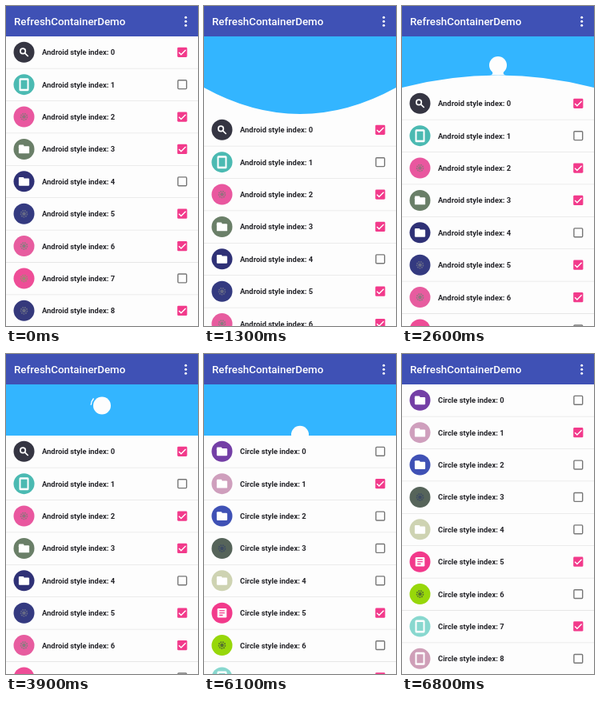
Animation, 240 px wide and 400 px high, one loop 7.5 s. Source, as an HTML page with a canvas:

```html
<!DOCTYPE html>
<html lang="en">
<head>
<meta charset="utf-8">
<title>RefreshContainerDemo</title>
<style>
  html, body { margin: 0; width: 100%; height: 100%; overflow: hidden; background: #fdfdfd; }
  canvas { display: block; width: 240px; height: 400px; }
</style>
</head>
<body>
<canvas id="stage" width="240" height="400"></canvas>
<script>
const c = document.getElementById('stage').getContext('2d');
const LOOP = 7500, STEP = 100;
const BAR = 38, HEAD = 64, BASE = BAR + HEAD, PULL = 97, ROW = 40.38;
const CX = 120, R = 11, BALL_Y = 64.5, STROKE = 1.4;
const WHITE = '#fdfdfd', BLUE = '#33b5ff', PINK = '#f23a8b';
// Times in ms
const PULL_AT = 650, RELEASE = 2320, SPIN_AT = 2690, FINISH = 5550, CLOSE = 6390;

// [avatar colour, icon, checked, icon colour]
const android = [
  ['#353542', 'search', 1], ['#4bbab2', 'phone', 0], ['#e9579f', 'gear', 1, '#97707f'],
  ['#6a7f68', 'folder', 1], ['#2f3176', 'folder', 0], ['#343a80', 'gear', 1, '#666a86'],
  ['#e75c9f', 'gear', 1, '#8d7a80'], ['#ee4d97', 'gear', 0, '#a18575'], ['#35397c', 'gear', 1, '#666a86']
];
const circle = [
  ['#743fa6', 'folder', 0], ['#cf9fbd', 'folder', 1], ['#3f51b5', 'folder', 0],
  ['#56645a', 'gear', 0, '#3d4a63'], ['#ced3b2', 'folder', 0], [PINK, 'article', 1],
  ['#97d70a', 'gear', 0, '#56732f'], ['#88d8cf', 'phone', 1], ['#cf9fb8', 'phone', 0]
];

const clamp = v => Math.max(0, Math.min(1, v));
const decelerate = u => 1 - (1 - clamp(u)) ** 2;

function rect(x, y, w, h, color, r = 0) {
  c.fillStyle = color;
  c.beginPath();
  c.roundRect(x, y, w, h, r);
  c.fill();
}

function disc(x, y, r, color) {
  c.fillStyle = color;
  c.beginPath();
  c.arc(x, y, r, 0, 7);
  c.fill();
}

function line(path, color, width) {
  c.strokeStyle = color;
  c.lineWidth = width;
  c.stroke(new Path2D(path));
}

function label(text, x, y, font) {
  c.font = font + ' Roboto, sans-serif';
  c.fillText(text, x, y);
}

const icons = {
  search() { line('M1.8-1.4a3.2 3.2 0 1 1-6.4 0a3.2 3.2 0 1 1 6.4 0M1 1L5.2 5.2', '#fff', 1.7); },
  phone(color) {
    rect(-6, -8, 12, 16, '#fff', 1.5);
    rect(-4, -5.5, 8, 11, color);
  },
  folder() {
    rect(-6.6, -5.4, 6.5, 4, '#fff', 1.2);
    rect(-6.6, -3.8, 13.2, 9.2, '#fff', 1.2);
  },
  article(color) {
    rect(-5.8, -5.8, 11.6, 11.6, '#fff', 1.3);
    line('M-3.3-2.8H3.3M-3.3 0H3.3M-3.3 2.8H1', color, 1.3);
  },
  gear(color, ink) {
    c.setLineDash([1.7, 1]);
    line('M4 0a4 4 0 1 1-8 0a4 4 0 1 1 8 0', ink, 1.6);
    c.setLineDash([]);
    disc(0, 0, 2.3, ink);
  }
};

function drawRow([color, icon, checked, ink], text, y) {
  disc(22.5, y, 13, color);
  c.save();
  c.translate(22.5, y);
  icons[icon](color, ink);
  c.restore();
  c.fillStyle = '#242429';
  label(text, 45, y + 3.5, 'bold 9.4px');
  c.save();
  c.translate(220.3, y);
  if (checked) {
    rect(-6.1, -6.1, 12.2, 12.2, PINK, 1.3);
    line('M-4.2.1L-1.4 2.9L4.3-2.9', '#fff', 1.4);
  } else {
    c.strokeStyle = '#777';
    c.lineWidth = 1.4;
    c.beginPath();
    c.roundRect(-5.4, -5.4, 10.8, 10.8, 1);
    c.stroke();
  }
  c.restore();
  rect(0, y + 20, 240, .8, '#e6e6e6');
}

// Low mound rising from the list edge
function mound(half, y, rise) {
  c.fillStyle = WHITE;
  c.beginPath();
  c.moveTo(CX - half, y);
  c.quadraticCurveTo(CX, y - rise, CX + half, y);
  c.fill();
}

// Neck between the ball and the list edge
function tail(ballY, bottom, k) {
  const y = ballY + R * k / 2, x = R * Math.sqrt(1 - k * k / 4);
  const near = R * .75 * (1 - k), far = near + R;
  c.fillStyle = WHITE;
  c.beginPath();
  c.moveTo(CX + x, y);
  c.quadraticCurveTo(CX + near, bottom, CX + far, bottom);
  c.lineTo(CX - far, bottom);
  c.quadraticCurveTo(CX - near, bottom, CX - x, y);
  c.fill();
}

function ring(start, sweep, r = R + 2 * STROKE) {
  const rad = Math.PI / 180;
  c.strokeStyle = WHITE;
  c.lineWidth = STROKE;
  c.beginPath();
  c.arc(CX, BALL_Y, r, start * rad, (start + sweep) * rad);
  c.stroke();
}

// One end of the arc runs at 10 degrees a tick, the other at 3; they swap roles
function spinner(t) {
  const ticks = (t - SPIN_AT) * .06, GROW = 39, SHRINK = 38;
  const turn = Math.floor(ticks / (GROW + SHRINK)), n = ticks % (GROW + SHRINK);
  const grown = Math.min(n, GROW), shrunk = n - grown;
  ring(90 + turn * (GROW * 3 + SHRINK * 10) + grown * 3 + shrunk * 10, grown * 7 - shrunk * 7);
}

function listShift(t) {
  if (t < RELEASE) {
    const u = clamp((t - PULL_AT) / 650);
    return t < 700 ? 0 : PULL * (1.15 * u - .15 * u * u);
  }
  if (t < CLOSE) return PULL - (PULL - HEAD) * decelerate((t - RELEASE) / 250);
  return HEAD * (1 - decelerate((t - CLOSE) / 330));
}

function waveHeight(t, shift) {
  if (t < RELEASE) return Math.max(0, shift - HEAD);
  const keys = [PULL - HEAD, 0, -26, 0, -10.5, 0, 0];
  const f = decelerate((t - RELEASE) / 1000) * 5, i = Math.floor(f);
  return keys[i] + (keys[i + 1] - keys[i]) * (f - i);
}

function drawLoading(t, wave) {
  const f = decelerate((t - RELEASE) / 1000);
  if (f < .2) return;
  if (f < .4) {
    const k = -wave / 26;
    if (k < .9) mound(R * (4 - 3 * k), BASE + wave, R * k * 2);
    else disc(CX, BASE + wave, R, WHITE);
    return;
  }
  const ballY = Math.max(BALL_Y, 76 - 25 * (f - .4));
  if (t < SPIN_AT) tail(ballY, BASE + wave, (HEAD + wave) / HEAD);
  else spinner(t);
  disc(CX, ballY, R, WHITE);
}

function drawFinish(p) {
  if (p < .3) {
    disc(CX, BALL_Y, R, WHITE);
    ring(90, 360 * (1 - p / .3), R + 2 * STROKE * (1 + p / .3));
  } else if (p < .7) {
    const k = (p - .3) / .4, y = BALL_Y + (BASE - BALL_Y) * k;
    disc(CX, y, R, WHITE);
    if (y > BASE - 2 * R) tail(y, BASE, k);
  } else if (p < 1) {
    const k = (p - .7) / .3;
    mound(R * (1 + 2 * k), BASE, R * (1 - k));
  }
}

function draw(t) {
  const shift = listShift(t), wave = waveHeight(t, shift);
  const edge = BAR + Math.min(shift, HEAD);
  rect(0, 0, 240, 400, WHITE);

  c.fillStyle = BLUE;
  c.beginPath();
  c.moveTo(0, BAR);
  c.lineTo(240, BAR);
  c.lineTo(240, edge);
  c.quadraticCurveTo(CX, edge + 2 * wave, 0, edge);
  c.fill();

  if (t >= FINISH) drawFinish((t - FINISH) / 800);
  else if (t >= RELEASE) drawLoading(t, wave);

  const [rows, name] = t < FINISH ? [android, 'Android'] : [circle, 'Circle'];
  rows.forEach((row, i) => drawRow(row, `${name} style index: ${i}`, 57.8 + shift + i * ROW));

  rect(0, 0, 240, BAR, '#3f51b5');
  c.fillStyle = '#fff';
  label('RefreshContainerDemo', 10, 24, '500 13.33px');
  for (const y of [14.3, 19.3, 24.3]) disc(224.7, y, 1.5, '#fff');
}

const began = performance.now();
function tick() {
  const t = (performance.now() - began) % LOOP;
  draw(Math.floor(t / STEP) * STEP);
  requestAnimationFrame(tick);
}
tick();
</script>
</body>
</html>
```
